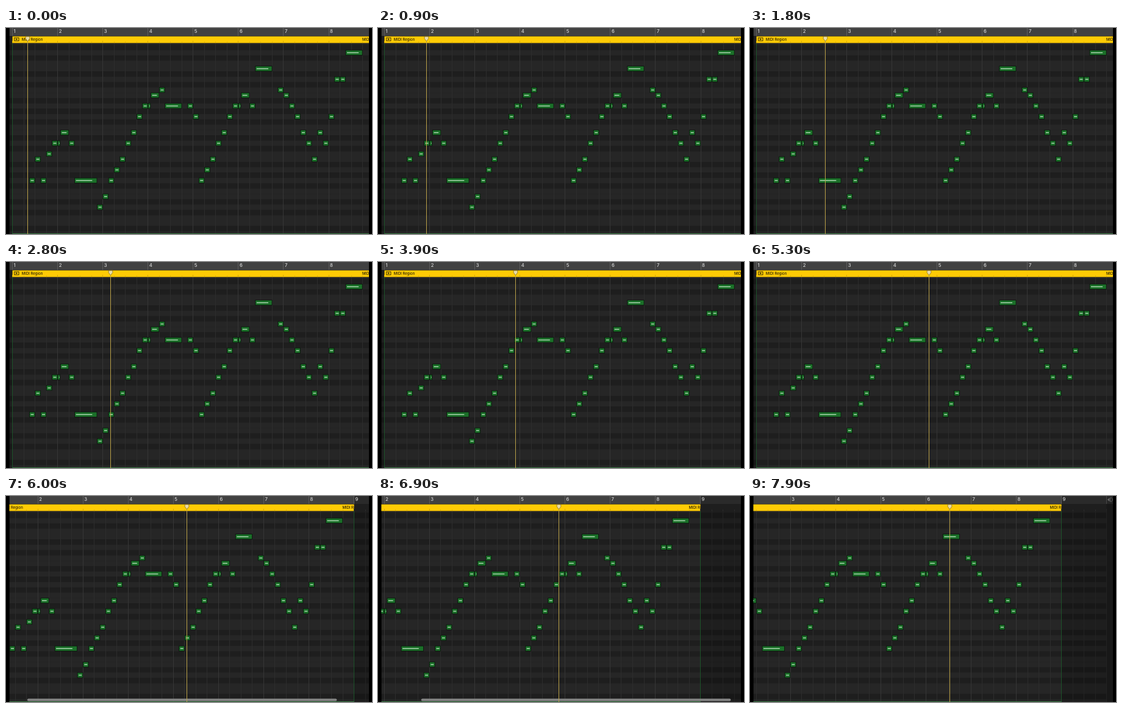
Write an HTML page with a canvas that moves like this. It is 600x338 px and loops after 8000 ms.

```html
<!DOCTYPE html>
<html lang="en">
<head>
<meta charset="utf-8">
<title>Piano roll</title>
<style>
html, body { margin: 0; width: 100%; height: 100%; overflow: hidden; background: #000; }
canvas { display: block; }
</style>
</head>
<body>
<canvas id="stage" width="600" height="338"></canvas>
<script>
const ctx = document.getElementById('stage').getContext('2d');
const LOOP = 8000, STEP = 100;
const LEFT = 5.5, RIGHT = 595, BAR = 74.06, EIGHTH = BAR / 8, START = 10.6;
const ROW = 8.741, ROW_TOP = 36.2;
const SPEED = 0.04858, HEAD_START = 35.8, PIN = 296.5, MAX_SCROLL = 92.5;
const BLACK_KEYS = [1, 4, 6, 9, 11];
const FONT = 'Inter, Roboto, "Liberation Sans", sans-serif';

// Runs of eighth notes: start, then one row per eighth.
const runs = [
  [3, 24, 20, 24, 19, 17],
  [10, 17],
  [15, 29, 27, 24, 22, 20, 17, 15, 12, 10],
  [26, 7],
  [31, 10, 12, 24, 22, 20, 17, 15, 12, 10],
  [42, 10],
  [47, 7, 8, 10, 12, 15, 17, 20, 15, 17, 12, 5, 5]
];
// Other lengths: start, row, length in eighths.
const notes = [
  [8, 17, 0.42], [8.5, 15, 1.45], [11, 24, 3.95],
  [24, 10, 0.42], [24.5, 8, 1.45], [27, 10, 2.95],
  [40, 10, 0.42], [40.5, 8, 1.45], [43, 3, 2.95], [59, 0, 2.95]
];
for (const [start, ...rows] of runs)
  rows.forEach((row, i) => notes.push([start + i, row, 0.96]));

// Scroll position by time, followed linearly.
const scrollKeys = [[5363, 0], [6000, 32.5], [6900, 74.5], [7266, MAX_SCROLL]];
function scrollAt(t) {
  if (t <= scrollKeys[0][0]) return 0;
  for (let i = 1; i < scrollKeys.length; i++) {
    const [t0, s0] = scrollKeys[i - 1], [t1, s1] = scrollKeys[i];
    if (t < t1) return s0 + (s1 - s0) * (t - t0) / (t1 - t0);
  }
  return MAX_SCROLL;
}

function rect(x, y, w, h, color) {
  ctx.fillStyle = color;
  ctx.fillRect(x, y, w, h);
}

function vline(x, y0, y1, color) {
  rect(Math.round(x - 0.5), y0, 1, y1 - y0, color);
}

function shape(points, fill, stroke) {
  ctx.beginPath();
  points.forEach(([x, y]) => ctx.lineTo(x, y));
  ctx.closePath();
  if (fill) { ctx.fillStyle = fill; ctx.fill(); }
  if (stroke) { ctx.strokeStyle = stroke; ctx.lineWidth = 0.8; ctx.stroke(); }
}

function label(text, x, y, font, color) {
  ctx.font = `${font} ${FONT}`;
  ctx.fillStyle = color;
  ctx.fillText(text, x, y);
}

function drawLanes() {
  for (let r = -2; r < 36; r++) {
    const black = BLACK_KEYS.includes((r + 12) % 12);
    rect(LEFT, ROW_TOP + r * ROW, RIGHT - LEFT, ROW + 0.5, black ? '#1e1e1e' : '#262626');
  }
}

function drawGrid(origin) {
  for (let b = 0; b <= 36; b++)
    vline(origin + b * BAR / 4, 25, 338, b % 4 ? '#2d2d2d' : '#363636');
}

function drawRegionFrame(origin) {
  const end = origin + 8 * BAR, shade = 'rgba(0, 0, 0, 0.22)';
  rect(LEFT, 25, Math.max(0, origin - LEFT), 313, shade);
  rect(end, 25, Math.max(0, RIGHT - end), 313, shade);
  vline(origin, 25, 338, '#1c5229');
  vline(end, 25, 338, '#1c5229');
  rect(origin, 337, end - origin, 1, '#3a7a45');
}

function drawRuler(origin) {
  const end = origin + 8 * BAR;
  rect(LEFT, 0, RIGHT - LEFT, 13, '#414141');
  rect(end, 0, Math.max(0, RIGHT - end), 13, '#2a2a2a');
  rect(LEFT, 13, RIGHT - LEFT, 12, '#1e1e1e');
  rect(origin, 13.7, end - origin, 10.9, '#ffcb05');
  for (let b = 0; b <= 36; b++) {
    const x = origin + b * BAR / 4;
    if (b % 4 === 0) {
      vline(x, 0, 13, '#5c5c5c');
      label(String(b / 4 + 1), x + 2, 7.9, '500 7.7px', '#d6d6d6');
    }
    vline(x, b % 4 ? 22.5 : 21, 24.6, b < 32 ? '#d3a806' : '#303030');
  }
}

function drawRegionName(origin) {
  const end = origin + 8 * BAR, ink = '#2b2300';
  const x = origin + 3.2;
  ctx.strokeStyle = ink;
  ctx.lineWidth = 0.9;
  ctx.strokeRect(x, 16, 7.2, 5);
  shape([[x + 2.4, 16.9], [x + 5.4, 18.5], [x + 2.4, 20.1]], ink);
  label('MIDI Region', origin + 15.2, 20.9, '500 6px', ink);
  ctx.save();
  ctx.beginPath();
  ctx.rect(0, 13, end, 12);
  ctx.clip();
  label('MIDI Region', end - 19.2, 20.9, '500 6px', ink);
  ctx.restore();
}

function drawNote(origin, [start, row, len]) {
  const x = origin + start * EIGHTH + 0.2, y = ROW_TOP + row * ROW, w = len * EIGHTH;
  rect(x - 0.5, y - 0.3, w + 0.8, ROW + 0.4, '#0b180d');
  rect(x + 0.4, y + 0.6, w - 1, ROW - 1.4, '#1b7029');
  const bar = len < 0.5 ? 1 : len < 1 ? w - 4 : (w - 4) * 0.82;
  rect(x + 2, y + ROW / 2 - 0.7, bar, 1.3, '#b9e0bd');
}

function drawProjectEnd(origin) {
  const x = origin + 9 * BAR - LEFT + LEFT + 8 * 0 + BAR * 0 + 0 + (RIGHT - RIGHT);
  if (x > RIGHT) return;
  rect(x, 0, RIGHT - x, 13, '#262626');
  rect(x, 13, RIGHT - x, 325, '#181818');
  shape([[x + 1.2, 6], [x + 4.6, 3], [x + 4.6, 9]], '#6a6a6a');
  shape([[x + 5.8, 3], [x + 8, 3], [x + 9.6, 4.6], [x + 9.6, 7.4], [x + 8, 9], [x + 5.8, 9]], null, '#6a6a6a');
}

function drawPlayhead(pos) {
  const x = Math.floor(pos) + 0.5;
  rect(x - 0.5, 21, 1, 317, '#b9a048');
  shape([[x - 3.3, 14], [x + 3.3, 14], [x + 3.3, 17.5], [x, 21.8], [x - 3.3, 17.5]], '#eadca6', '#8c7419');
}

function drawScrollbar(scroll, alpha) {
  ctx.globalAlpha = alpha;
  ctx.fillStyle = '#858585';
  ctx.beginPath();
  ctx.roundRect(7 + scroll * 0.857, 332.4, 507.5, 4, 2);
  ctx.fill();
  ctx.globalAlpha = 1;
}

function draw(t) {
  const scroll = scrollAt(t), origin = START - scroll;
  const scrolling = scroll > 0 && scroll < MAX_SCROLL;
  const head = scrolling ? PIN : HEAD_START + SPEED * t - scroll;
  rect(0, 0, 600, 338, '#000');
  ctx.save();
  ctx.beginPath();
  ctx.rect(LEFT, 0, RIGHT - LEFT, 338);
  ctx.clip();
  drawLanes();
  drawGrid(origin);
  drawRegionFrame(origin);
  notes.forEach(n => drawNote(origin, n));
  drawRuler(origin);
  drawRegionName(origin);
  drawProjectEnd(origin);
  if (scroll > 0) drawScrollbar(scroll, Math.max(0, Math.min(1, (7800 - t) / 250)));
  drawPlayhead(head);
  ctx.restore();
}

function frame() {
  const t = performance.now() % LOOP;
  draw(Math.floor(t / STEP) * STEP);
  requestAnimationFrame(frame);
}
frame();
</script>
</body>
</html>
```
